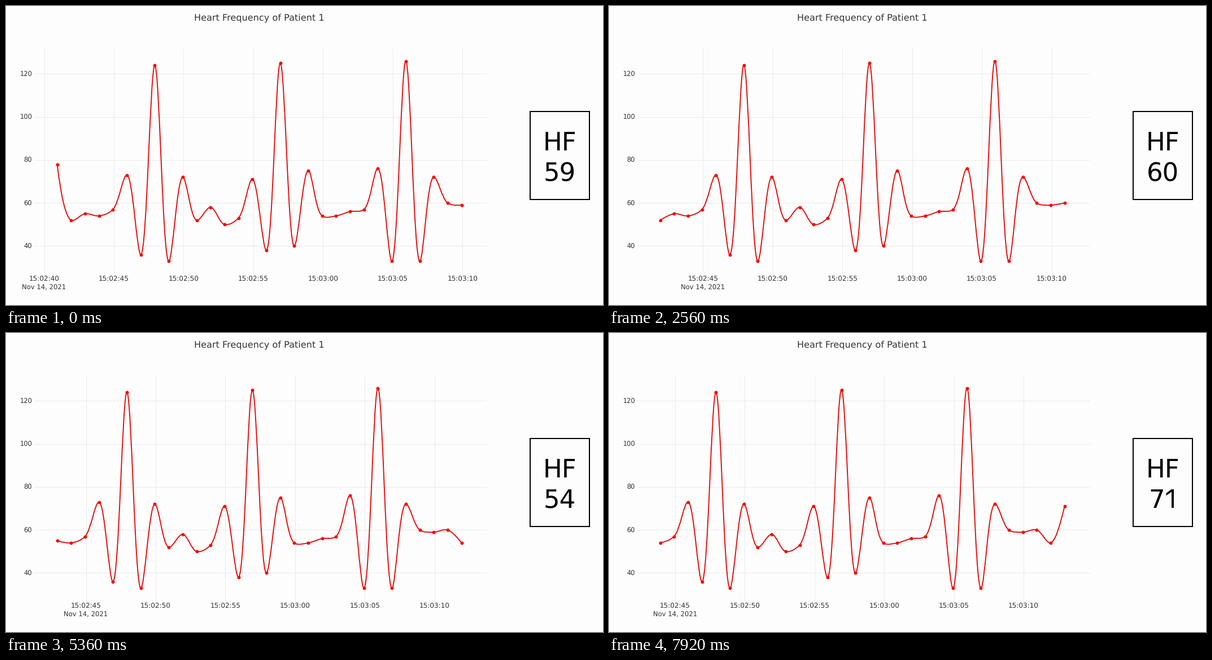
A matplotlib script that plays this animation: 1057 px wide and 530 px high, repeating every 8000 ms.

```python
import matplotlib.pyplot as plt
import numpy as np
from matplotlib.animation import FuncAnimation
from matplotlib.patches import PathPatch, Polygon, Rectangle
from matplotlib.path import Path

W, H, DPI = 1057, 530, 64
PT = 72 / DPI                       # points per pixel
LOOP_MS, STEP_MS = 8000, 40
FIRST_UPDATE_MS, UPDATE_MS = 1020, 3000

WINDOW = 30                         # samples on screen
SECOND = 24.69                      # pixels per second
X_FIRST = 90.6                      # x of the oldest sample
X_TICK = 67.5                       # x of the first tick, 15:02:40
PLOT_LEFT, PLOT_RIGHT, PLOT_TOP, PLOT_BOTTOM = 49, 851, 74, 475

RATES = np.array([
    78, 52, 55, 54, 57, 73, 36, 124, 33, 72, 52, 58, 50, 53, 71, 38, 125,
    40, 75, 54, 54, 56, 57, 76, 33, 126, 33, 72, 60, 59, 60, 54, 71])

plt.rcParams.update({"font.family": "DejaVu Sans", "text.hinting": "none",
                     "toolbar": "None"})
fig = plt.figure(figsize=(W / DPI, H / DPI), dpi=DPI, facecolor="#fdfdfd")
ax = fig.add_axes([0, 0, 1, 1])
ax.set_xlim(0, W)
ax.set_ylim(H, 0)
ax.axis("off")


def rate_y(rate):
    return 425.4 - (rate - 40) * 3.8125


def label(x, y, text, size, color="#333333", ha="center"):
    return ax.text(x, y, text, fontsize=size * PT, color=color, ha=ha,
                   va="baseline")


def rule(xs, ys, color="#eaeaea", z=1):
    return ax.plot(xs, ys, color=color, lw=PT, zorder=z,
                   solid_capstyle="butt")[0]


def control_points(before, here, after):
    """Centripetal Catmull-Rom handles on both sides of a point."""
    d1, d2 = before - here, after - here
    a1, a2 = np.hypot(*d1) ** 0.5, np.hypot(*d2) ** 0.5
    bend = a2 ** 2 * d1 - a1 ** 2 * d2
    total = 3 * (a1 + a2)
    return here + bend / (a2 * total), here - bend / (a1 * total)


def spline(points):
    handles = [control_points(*points[i - 1:i + 2])
               for i in range(1, len(points) - 1)]
    verts = [points[0], handles[0][0], points[1]]
    codes = [Path.MOVETO, Path.CURVE3, Path.CURVE3]
    for left, right, point in zip(handles, handles[1:], points[2:]):
        verts += [left[1], right[0], point]
        codes += [Path.CURVE4] * 3
    verts += [handles[-1][1], points[-1]]
    codes += [Path.CURVE3] * 2
    return Path(verts, codes)


def curve_points(shift):
    x = X_FIRST + SECOND * np.arange(WINDOW)
    return np.column_stack([x, rate_y(RATES[shift:shift + WINDOW])])


def clock(seconds):
    return f"15:{2 + seconds // 60:02d}:{seconds % 60:02d}"


# Fixed parts
label(448.7, 26, "Heart Frequency of Patient 1", 16.17)
for rate in range(40, 121, 20):
    y = rate_y(rate)
    rule([PLOT_LEFT, PLOT_RIGHT], [y, y])
    label(46.3, y + 4.2, str(rate), 11.5, ha="right")
rule([0, W], [529.5, 529.5], "#b4b4b4")
ax.add_patch(Rectangle((928, 187), 105, 155.5, fill=False, ec="black",
                       lw=2 * PT, joinstyle="miter"))
label(980.5, 256, "HF", 45, "black")

# Moving parts
ticks = [(rule([0, 0], [PLOT_TOP, PLOT_BOTTOM]),
          label(0, 488, clock(40 + 5 * i), 11.95)) for i in range(7)]
date = label(0, 502.7, "Nov 14, 2021", 11.6)
curve = ax.add_patch(PathPatch(spline(curve_points(0)), fill=False,
                               ec="#e60a0a", lw=1.9 * PT, zorder=3,
                               capstyle="butt", joinstyle="round"))
dots, = ax.plot([], [], "o", ms=5.9 * PT, color="#f80000", mew=0, zorder=4)
value = label(980.5, 310, "", 45, "black")
# A plain "1" without a foot
slim_one = ax.add_patch(Polygon(
    [(996, 310), (1000, 310), (1000, 277), (996, 277), (986.5, 284),
     (986.5, 288.3), (996, 281.5)], fc="black", lw=0))


def show_value(rate):
    tens, ones = divmod(int(rate), 10)
    slim = ones == 1
    slim_one.set_visible(slim)
    value.set_text(str(tens) if slim else str(rate))
    value.set_x(970 if slim else 980.5)


def update(frame):
    t = frame * STEP_MS + STEP_MS // 2
    shift = max(0, (t - FIRST_UPDATE_MS) // UPDATE_MS + 1)
    points = curve_points(shift)
    curve.set_path(spline(points))
    dots.set_data(points[:, 0], points[:, 1])
    show_value(RATES[shift + WINDOW - 1])

    shown = []
    for i, (line, text) in enumerate(ticks):
        x = X_TICK + SECOND * (5 * i - shift)
        visible = x >= PLOT_LEFT
        line.set_xdata([x, x])
        text.set_x(x)
        line.set_visible(visible)
        text.set_visible(visible)
        if visible:
            shown.append(x)
    date.set_x(shown[0])
    return [curve, dots, value, slim_one, date]


anim = FuncAnimation(fig, update, frames=LOOP_MS // STEP_MS,
                     interval=STEP_MS, repeat=True, repeat_delay=0,
                     blit=False)
plt.show()
```
